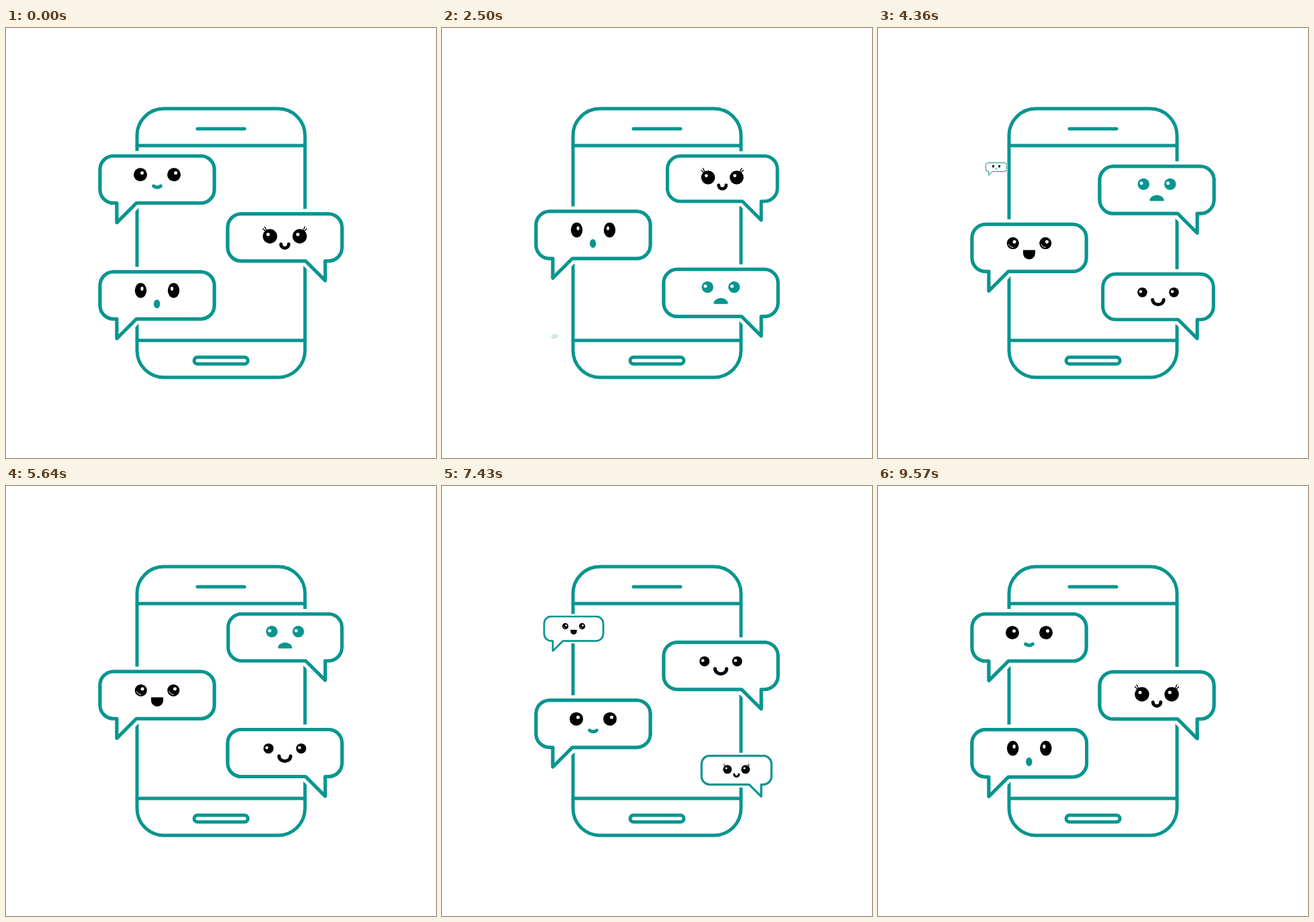
Recreate the animation shown at these times as an HTML page. Size 640 px wide and 640 px high, loop 9.71 s.

```html
<!DOCTYPE html>
<html lang="en">
<head>
<meta charset="utf-8">
<title>Chatting bubbles</title>
<style>
  html, body { margin: 0; width: 100%; height: 100%; overflow: hidden; background: #fff; }
  svg { display: block; width: 100vw; height: 100vh; }
  .line { fill: none; stroke: #08958f; stroke-width: 5; stroke-linecap: round; stroke-linejoin: round; }
  .body { fill: #fff; }
  .halo { fill: #fff; stroke: #fff; stroke-width: 15; stroke-linejoin: round; }
  .teal { fill: #08958f; }
  .white { fill: #fff; }
  .mouth { fill: none; stroke: #000; stroke-width: 5; stroke-linecap: round; }
  .thin { fill: none; stroke: #000; stroke-width: 1.3; stroke-linecap: round; }
  .glint { fill: none; stroke: #fff; stroke-width: 1; stroke-linecap: round; }
</style>
</head>
<body>
<svg viewBox="0 0 640 640">
  <g class="line">
    <rect x="195" y="120" width="250" height="400" rx="40"/>
    <path d="M195 175H445M195 465H445M285 150H355"/>
    <rect x="280" y="490" width="80" height="10" rx="5"/>
  </g>
  <g id="bubbles"></g>
</svg>
<script>
const LOOP = 9710, STEP = 1600, REST = 800, MOVE = 780, FPS = 14;
const TOP = 289.5, GAP = 86.25;

// Bubble outline, with the tip of its tail at the origin
const OUTLINE = 'M0 0V-29H-5A20 20 0 0 1-25-49V-79A20 20 0 0 1-5-99' +
  'H125A20 20 0 0 1 145-79V-49A20 20 0 0 1 125-29H29Z';

const oval = (x, y, rx, ry, cls = '') =>
  `<ellipse class="${cls}" cx="${x}" cy="${y}" rx="${rx}" ry="${ry}"/>`;
const path = (d, cls = '') => `<path class="${cls}" d="${d}"/>`;

// A pair of eyes at ±x; dl and dr shift each highlight sideways
function eyes({ x, y, rx, ry = rx, dl, dr = dl, dy, hx = 2.5, hy = hx, cls }) {
  return [[-x, dl], [x, dr]].map(([cx, dx]) =>
    oval(cx, y, rx, ry, cls) + oval(cx + dx, y + dy, hx, hy, 'white')).join('');
}

const faces = [
  eyes({ x: 25, y: -71.3, rx: 10, dl: 2.5, dy: -2.5 }) +
    path('M-5.3-54.3Q0-50.3 5.3-54.3', 'line'),

  eyes({ x: 22.1, y: -65.8, rx: 10.7, dl: -2.8, dy: -2.8 }) +
    path('M-5.8-54A5.8 5.8 0 0 0 5.8-54', 'mouth') +
    path('M-28-72.5L-32.5-77M-27-74L-30-80M28-72.5L32.5-77M27-74L30-80', 'thin'),

  eyes({ x: 24.5, y: -71.4, rx: 8.7, ry: 11.1, dl: 2, dr: -2.5, dy: -2.6, hx: 2.1, hy: 2.9 }) +
    oval(-0.4, -51.3, 4.7, 6.5, 'teal'),

  eyes({ x: 19.8, y: -72.7, rx: 8.7, dl: -3.2, dy: -1.3, cls: 'teal' }) +
    path('M-10.6-49.5C-8-58.5 8-58.5 10.6-49.5Q11-47.6 9-47.6H-9Q-11-47.6-10.6-49.5Z', 'teal'),

  eyes({ x: 24.2, y: -71, rx: 9, dl: 2.2, dy: -2.2 }) +
    path('M-30.4-69.5Q-29-65-24.2-64.8M18-69.5Q19.4-65 24.2-64.8', 'glint') +
    path('M-9-60.8H9V-56A9 9 0 0 1-9-56Z'),

  eyes({ x: 24.3, y: -70.8, rx: 7.5, dl: -2.5, dy: -1.2, hx: 2.3 }) +
    path('M-8.6-59.6A8.6 7.6 0 0 0 8.6-59.6', 'mouth')
];

const layer = document.getElementById('bubbles');
layer.innerHTML = faces.map((face, i) => {
  const side = i % 2 ? -1 : 1;
  return `<g><g transform="scale(${side} 1)">${path(OUTLINE, 'halo')}${path(OUTLINE, 'line')}` +
    `${path(OUTLINE, 'line body" style="fill:#fff')}</g>` +
    `<g transform="translate(${side * 60} 0)">${face}</g></g>`;
}).join('');
const bubbles = [...layer.children];

// Cubic Bézier easing through (x1, 0) and (x2, y2)
function bezier(x1, x2, y2) {
  const at = (u, a, b) => 3 * u * (1 - u) ** 2 * a + 3 * u * u * (1 - u) * b + u ** 3;
  return p => {
    if (p <= 0 || p >= 1) return p <= 0 ? 0 : 1;
    let low = 0, high = 1;
    for (let i = 0; i < 30; i++) {
      const mid = (low + high) / 2;
      if (at(mid, x1, x2) < p) low = mid; else high = mid;
    }
    return at(low, 0, y2);
  };
}
const slide = bezier(0.44, 0, 1);
const shrink = bezier(0.46, 0, 1);
const grow = bezier(0.46, 0, 1.35);

function draw(now) {
  const time = Math.floor((now % LOOP + 5) * FPS / 1000) * 1000 / FPS;
  const turn = Math.floor(time / STEP);
  const p = (time - turn * STEP - REST) / MOVE;

  bubbles.forEach((bubble, i) => {
    const slot = (i - turn + 12) % 6;
    const scale = slot === 0 ? 1 - shrink(p) : slot === 3 ? grow(p) : 1;
    const y = TOP + GAP * (slot === 3 ? 2 : slot - slide(p));
    const shown = slot < 4 && scale > 0.001;
    bubble.style.display = shown ? '' : 'none';
    bubble.setAttribute('transform', `translate(${i % 2 ? 475 : 165} ${y}) scale(${scale})`);
  });
}

const start = performance.now();
function frame() {
  draw(performance.now() - start);
  requestAnimationFrame(frame);
}
frame();
</script>
</body>
</html>
```
